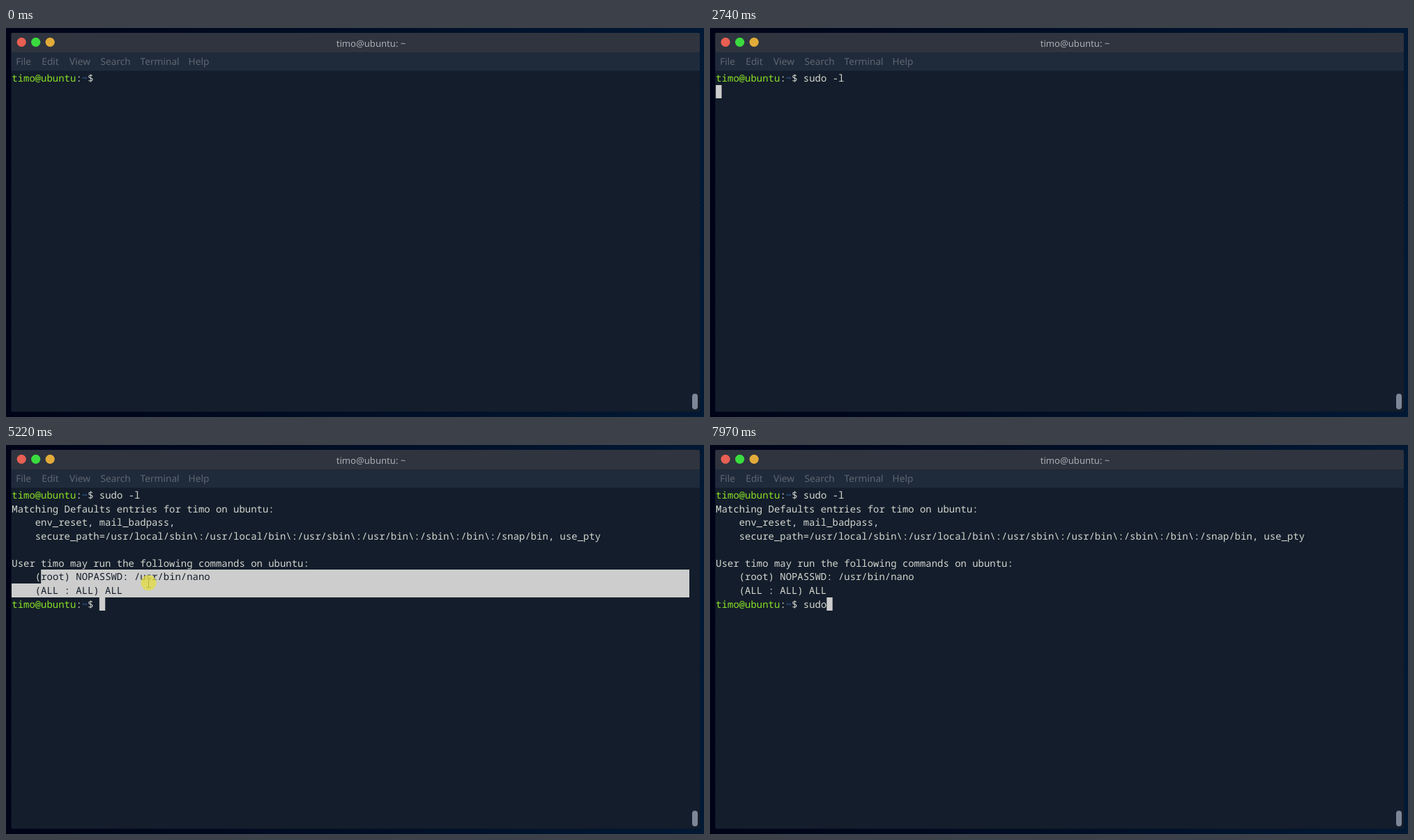
Recreate the animation shown at these times as an HTML page with a canvas. Size 1001x559 px, loop 8 s.

```html
<!DOCTYPE html>
<html lang="en">
<head>
<meta charset="utf-8">
<title>Terminal</title>
<style>
html, body { margin: 0; width: 100%; height: 100%; overflow: hidden; background: #010a20; }
canvas { display: block; }
</style>
</head>
<body>
<canvas id="stage" width="1001" height="559"></canvas>
<script>
const ctx = document.getElementById('stage').getContext('2d');
const LOOP = 8000, X0 = 8.3, Y0 = 62, CW = 8.372, RH = 19.57;
const BG = '#141d2b', FG = '#d3d7cf', BLOCK = '#cccdcc';
const MONO = '13.953px "Noto Sans Mono", monospace';
const SANS = '"Noto Sans", sans-serif';
const USER = 'timo';

const output = [
  `Matching Defaults entries for ${USER} on ubuntu:`,
  '    env_reset, mail_badpass,',
  '    secure_path=/usr/local/sbin\\:/usr/local/bin\\:/usr/sbin\\:/usr/bin\\:/sbin\\:/bin\\:/snap/bin, use_pty',
  '',
  `User ${USER} may run the following commands on ubuntu:`,
  '    (root) NOPASSWD: /usr/bin/nano',
  '    (ALL : ALL) ALL'
];

const TYPE1 = 1410, ENTER = 2740, PRINTED = 2810, PROMPT = 2880, TYPE2 = 7570;

// Pointer glides: start, end, x, y reached
const glides = [
  [460, 810, 630, 368],
  [3500, 3780, 149.5, 85],
  [3780, 4260, 46, 190],
  [4480, 5280, 207, 198],
  [5350, 5550, 245, 199],
  [5750, 6020, 295, 192],
  [6280, 6480, 339, 272]
];

const within = (t, a, b) => t >= a && t < b;
const smooth = f => f * f * (3 - 2 * f);
const typed = (text, t, start, step) => text.slice(0, Math.max(0, Math.floor((t - start) / step) + 1));
const blink = (t, start, half) => t >= start && Math.floor((t - start) / half) % 2 === 0;
const rowTop = r => Math.round(Y0 + r * RH);
const colX = c => X0 + c * CW;

function pointerAt(t) {
  if (!within(t, 460, TYPE1) && !within(t, 3560, TYPE2)) return null;
  let x = 905, y = 552;
  for (const [t0, t1, toX, toY] of glides) {
    const f = smooth(Math.min(1, Math.max(0, (t - t0) / (t1 - t0))));
    x += (toX - x) * f;
    y += (toY - y) * f;
  }
  return { x, y };
}

function rect(x, y, w, h, color, r = 0) {
  ctx.fillStyle = color;
  ctx.beginPath();
  ctx.roundRect(x, y, w, h, r);
  ctx.fill();
}

function disc(x, y, r, color) {
  ctx.fillStyle = color;
  ctx.beginPath();
  ctx.arc(x, y, r, 0, 7);
  ctx.fill();
}

function label(text, x, y, font, color) {
  ctx.font = font;
  ctx.fillStyle = color;
  ctx.fillText(text, x, y);
}

function mono(text, col, row, color = FG, weight = 400) {
  label(text, colX(col), Y0 + 15 + row * RH, `${weight} ${MONO}`, color);
}

function prompt(row, command) {
  mono(USER + '@ubuntu', 0, row, '#8ae226', 500);
  mono(':', 11, row);
  mono('~', 12, row, '#3465a4');
  mono('$ ' + command, 13, row);
}

function blockCursor(col, row) {
  rect(colX(col), rowTop(row), CW, rowTop(row + 1) - rowTop(row), BLOCK);
}

function drawWindow() {
  const g = ctx.createLinearGradient(0, 0, 1001, 0);
  g.addColorStop(0, '#000418');
  g.addColorStop(1, '#021a36');
  rect(0, 0, 1001, 559, g);
  ctx.strokeStyle = 'rgba(0,0,12,.3)';
  ctx.lineWidth = 1;
  ctx.beginPath();
  for (let x = 0; x < 1560; x += 6) {
    ctx.moveTo(x, 0);
    ctx.lineTo(x - 559, 559);
  }
  ctx.stroke();

  rect(7.5, 7, 987.5, 544.5, BG, 2);
  rect(7.5, 7, 987.5, 28.5, '#2f343f', [2, 2, 0, 0]);
  rect(7.5, 35.5, 987.5, 26, '#1f2a3b');
  ['#e85f53', '#3bdb40', '#e2ab39'].forEach((c, i) => disc(22.2 + i * 20.5, 20.3, 6.6, c));

  ctx.textAlign = 'center';
  label(USER + '@ubuntu: ~', 523.5, 27, '13.1px ' + SANS, '#a9adb3');
  ctx.textAlign = 'left';
  const menu = { File: 14.2, Edit: 51.3, View: 91, Search: 135.5, Terminal: 192.6, Help: 261.6 };
  for (const name in menu) label(name, menu[name], 53, '13.7px ' + SANS, '#5f666f');
  rect(984, 525.5, 8, 22.5, '#7e8798', 4);
}

function drawSelection(t, pointer) {
  if (!within(t, 4480, 6680)) return;
  const bothRows = within(t, 5000, 5350) || within(t, 5480, 5950);
  const line = output[5], left = colX(5), top = rowTop(6), mid = rowTop(7);
  const hover = Math.round((pointer.x - X0) / CW);
  const end = bothRows ? line.length : Math.max(5, Math.min(line.length, hover));
  rect(left, top, (bothRows ? 980 : colX(end)) - left, mid - top, BLOCK);
  mono(line.slice(5, end), 5, 6, BG);
  mono(line.slice(end), end, 6);
  if (bothRows) {
    rect(8, mid, 972, rowTop(8) - mid, BLOCK);
    mono(output[6], 0, 7, BG);
  }
}

function drawPointer({ x, y }, pressed) {
  ctx.save();
  ctx.translate(x, y);
  ctx.beginPath();
  for (const s of [-1, 1]) {
    ctx.moveTo(-3, 7 * s);
    ctx.lineTo(-1, 7 * s);
    ctx.lineTo(0, 6 * s);
    ctx.lineTo(1, 7 * s);
    ctx.lineTo(3, 7 * s);
  }
  ctx.moveTo(0, -6);
  ctx.lineTo(0, 6);
  ctx.lineCap = 'square';
  ctx.lineWidth = 2.6;
  ctx.strokeStyle = '#e8e8e8';
  ctx.stroke();
  ctx.lineWidth = 1;
  ctx.strokeStyle = '#10141c';
  ctx.stroke();
  ctx.restore();
  if (pressed) disc(x, y, 11, 'rgba(228,221,65,.76)');
}

function draw(t) {
  ctx.textRendering = 'geometricPrecision';
  drawWindow();

  const first = typed('sudo -l', t, TYPE1, 140);
  const second = typed('sudo', t, TYPE2, 133);
  const pointer = pointerAt(t);

  prompt(0, first);
  if (t >= PRINTED) output.forEach((line, i) => mono(line, 0, i + 1));
  if (t >= PROMPT) prompt(8, second);
  drawSelection(t, pointer);

  if (t < ENTER) {
    if (first || blink(t, 70, 635)) blockCursor(15 + first.length, 0);
  } else if (t < PRINTED) {
    blockCursor(0, 1);
  } else if (t >= PROMPT && (second || blink(t, 2696, 603))) {
    blockCursor(15 + second.length, 8);
  }

  if (pointer) drawPointer(pointer, within(t, 4260, 6280) || within(t, 6680, 6890));
}

const start = performance.now();
function tick() {
  draw((performance.now() - start) % LOOP);
  requestAnimationFrame(tick);
}
tick();
</script>
</body>
</html>
```
